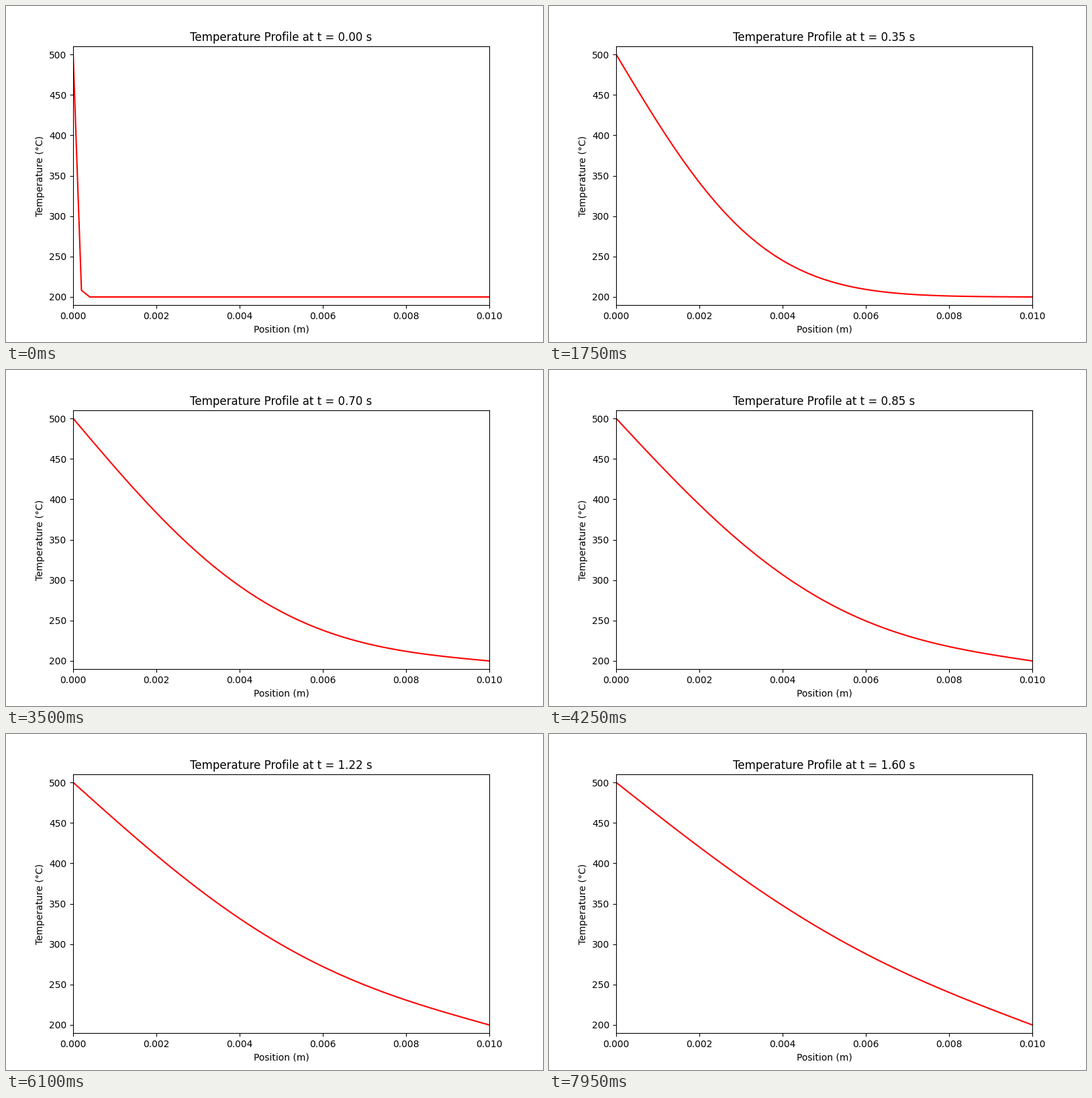
Animation, 800 px wide and 500 px high, one loop 8 s. Source, as a matplotlib script:

```python
import numpy as np
import matplotlib.pyplot as plt
from matplotlib.animation import FuncAnimation

# Explicit finite differences for 1D heat conduction in a thin wall
LENGTH = 0.01        # m
CELLS = 50
ALPHA = 1.1e-5       # m^2/s
DT = 1e-4            # s
T_HOT, T_COLD = 500.0, 200.0

STEPS, SAMPLES = 30000, 300   # full 3 s run, evenly sampled
FRAMES, INTERVAL = 160, 50

x = np.linspace(0, LENGTH, CELLS + 1)
r = ALPHA * DT / (LENGTH / CELLS) ** 2
sample_steps = np.linspace(0, STEPS - 1, SAMPLES).astype(int)[:FRAMES]


def solve():
    """Return one temperature profile for each sampled step."""
    temp = np.full(CELLS + 1, T_COLD)
    temp[0] = T_HOT
    profiles = []
    for step in range(sample_steps[-1] + 1):
        temp[1:-1] += r * (temp[2:] - 2 * temp[1:-1] + temp[:-2])
        if step == sample_steps[len(profiles)]:
            profiles.append(temp.copy())
    return profiles


profiles = solve()

plt.rcParams["font.family"] = "DejaVu Sans"
fig, ax = plt.subplots(figsize=(8, 5), dpi=100)
line, = ax.plot(x, profiles[0], color="red", lw=1.5)
ax.set_xlim(0, LENGTH)
ax.set_ylim(T_COLD - 10, T_HOT + 10)
ax.set_xlabel("Position (m)")
ax.set_ylabel("Temperature (°C)")
title = ax.set_title("")


def update(frame):
    line.set_ydata(profiles[frame])
    title.set_text(f"Temperature Profile at t = {sample_steps[frame] * DT:.2f} s")
    return line, title


def init():
    return update(0)


anim = FuncAnimation(fig, update, frames=FRAMES, init_func=init,
                     interval=INTERVAL, repeat=True, repeat_delay=0)
plt.show()
```
